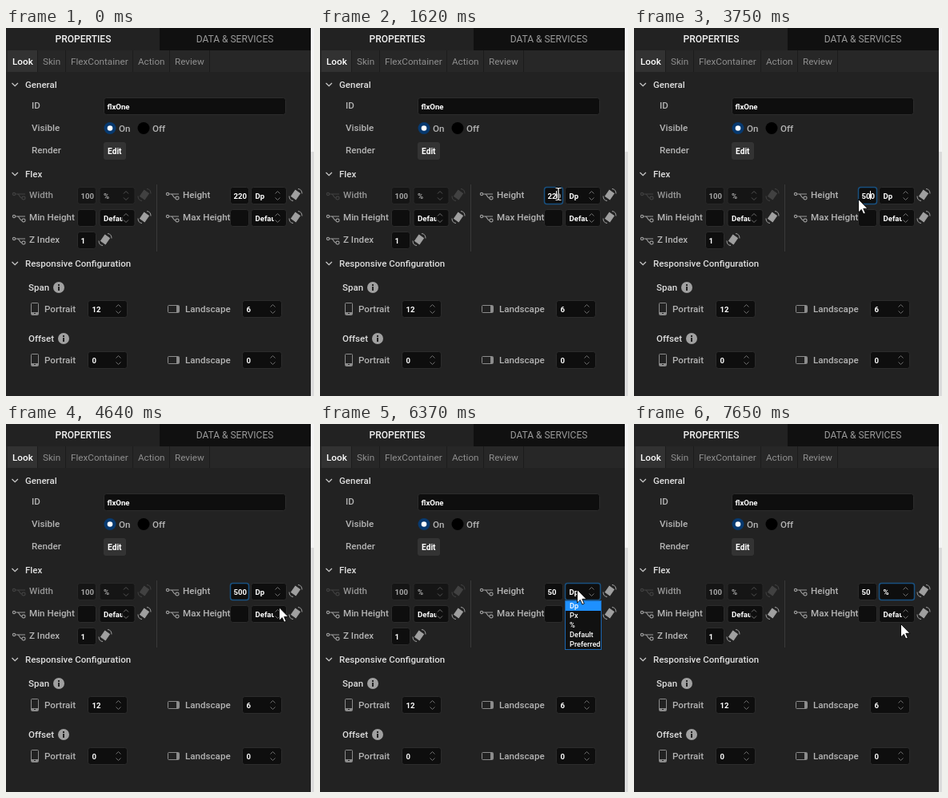
Animation, 385 px wide and 461 px high, one loop 8 s. Source, as an HTML page:

```html
<!DOCTYPE html>
<html lang="en">
<head>
<meta charset="utf-8">
<title>Properties panel</title>
<style>
  html, body { margin: 0; width: 100%; height: 100%; overflow: hidden; background: #222; }
  svg { display: block; font-family: Roboto, sans-serif; }
</style>
</head>
<body>
<svg id="stage" width="385" height="461" viewBox="0 0 385 461">
  <g id="panel"></g>
  <g id="live"></g>
</svg>
<script>
const LOOP = 8000;
const $ = id => document.getElementById(id);

const rect = (x, y, w, h, fill, extra = '') =>
  `<rect x="${x}" y="${y}" width="${w}" height="${h}" fill="${fill}" ${extra}/>`;
const text = (x, y, str, fill = '#b4b4b4', size = 11.6, weight = 500, extra = '') =>
  `<text x="${x}" y="${y}" fill="${fill}" font-size="${size}" font-weight="${weight}" ${extra}>${str}</text>`;
const line = (d, stroke, width = 1) =>
  `<path d="${d}" fill="none" stroke="${stroke}" stroke-width="${width}"/>`;
const fade = (alpha, markup) => `<g opacity="${alpha}">${markup}</g>`;

const box = (x, cy, w, focus) => rect(x + .5, cy - 10.5, w - 1, 21, '#0e0e0e',
  `rx="3" stroke="${focus ? '#185080' : '#2c2c2c'}" stroke-width="${focus ? 1.5 : 1}"`);
const value = (x, cy, str) => text(x, cy + 3.7, str, '#fff', 9.6, 700);
const field = (x, cy, w, str, focus) => box(x, cy, w, focus) + value(x + 4.5, cy, str);

function select(x, cy, w, str, focus) {
  const ax = x + w - 11.5;
  return box(x, cy, w, focus) +
    `<svg x="${x}" y="${cy - 10}" width="${w - 16}" height="20">${value(5.5, 10, str)}</svg>` +
    line(`M${ax - 3},${cy - 2.5}l3,-3l3,3M${ax - 3},${cy + 2.5}l3,3l3,-3`, '#707070');
}

const branch = (x, cy) => `<g transform="translate(${x} ${cy})" fill="none" stroke="#9a9a9a" stroke-width="1.2">
  <circle cx="2" cy="-2" r="1.6"/><path d="M4,-2H16M6,-2C9.5,-2 8.5,3 12,3"/>
  <rect x="12" y="1.2" width="4" height="3.6" rx="1.5"/></g>`;
const turn = (x, cy) => `<g transform="translate(${x} ${cy - 1})" stroke="#a0a0a0" fill="none">
  <rect x="-3.5" y="-4.5" width="7" height="9" fill="#a0a0a0" transform="rotate(35)"/>
  <path d="M3,-7.5Q8,-7 8,-1.5M-3,7.5Q-8,7 -8,1.5"/></g>`;
const info = (x, cy) => `<circle cx="${x}" cy="${cy}" r="7" fill="#a0a0a0"/>` +
  rect(x - 1, cy - 4, 2, 2, '#222') + rect(x - 1, cy - 1, 2, 5, '#222');
const heading = (x, y, str) => text(x, y, str, '#dedede', 11.5);
const section = (cy, name) =>
  line(`M7.5,${cy - 2}l3.7,3.7l3.7,-3.7`, '#c8c8c8', 1.3) + heading(24, cy + 4, name);

function flexRow(x, cy, name, num, unit, off) {
  const icons = branch(x, cy) + turn(x + (unit ? 165 : 116), cy);
  const inputs = field(x + 81, cy, 24, num) + (unit ? select(x + 108.5, cy, 45, unit) : '');
  return (off ? fade(.25, icons) + fade(.6, inputs) : icons + inputs) +
    text(x + 21, cy + 3, name, off ? '#959595' : undefined);
}

function deviceRow(cy, name, a, b) {
  return heading(28, cy - 23, name) + info(name === 'Span' ? 66 : 72, cy - 27) +
    rect(31.5, cy - 7.5, 9, 15, 'none', 'rx="1" stroke="#8c8c8c"') +
    rect(32, cy + 4, 8, 3, '#8c8c8c') + rect(35, cy + 5, 2, 1, '#222') +
    rect(202.5, cy - 4.5, 14, 9, 'none', 'rx="1" stroke="#8c8c8c"') + rect(213, cy - 4, 3, 8, '#8c8c8c') +
    text(48, cy + 4, 'Portrait') + text(224, cy + 4, 'Landscape') +
    select(102, cy, 50, a) + select(295, cy, 50, b);
}

function panel() {
  let s = rect(0, 0, 385, 461, '#222') + rect(192, 0, 193, 28, '#101010') +
    rect(0, 28, 385, 27, '#272727') + rect(2, 28, 37, 27, '#323232') +
    text(96.5, 18, 'PROPERTIES', '#f2f2f2', 12, 500, 'text-anchor="middle"') +
    text(286, 18, 'DATA &amp; SERVICES', '#9a9a9a', 12, 400, 'text-anchor="middle"') +
    line('M39.5,28V55M74.5,28V55M158.5,28V55M204.5,28V55M254.5,28V55', '#1c1c1c');
  const tabs = [[8, 'Look'], [46, 'Skin'], [81, 'FlexContainer'], [165, 'Action'], [211, 'Review']];
  tabs.forEach(([x, name], i) => s += text(x, 46, name, i ? '#8f8f8f' : '#fff', 11.7, i ? 400 : 500));
  s += section(71, 'General') + text(32, 101, 'ID') + text(32, 129, 'Visible') + text(32, 157, 'Render') +
    field(122, 98, 228, 'flxOne') +
    '<circle cx="130" cy="125.5" r="7.5" fill="#07396f"/><circle cx="130" cy="125.5" r="3.3" fill="#fff"/>' +
    '<circle cx="172" cy="125.5" r="7.5" fill="#000"/>' +
    text(141, 130, 'On') + text(183, 130, 'Off') +
    rect(122, 143, 28, 22, '#333', 'rx="3"') + text(127, 157.5, 'Edit', '#fff', 10.2, 700) +
    section(183, 'Flex') + line('M188.5,196V280', '#3a3a3a') +
    flexRow(8, 210, 'Width', '100', '%', true) + flexRow(8, 238, 'Min Height', '', 'Default') +
    flexRow(8, 266, 'Z Index', '1') +
    branch(200, 210) + text(221, 213, 'Height') + turn(362, 210) +
    branch(200, 238) + text(221, 241, 'Max Height') + field(280, 238, 24, '') +
    select(306, 238, 45, 'Default') + turn(362, 238) +
    section(295, 'Responsive Configuration') +
    deviceRow(352, 'Span', '12', '6') + deviceRow(416, 'Offset', '0', '0') +
    rect(381, 0, 4, 155, '#f4f4f4') + rect(381, 155, 4, 306, '#dcdcdc');
  return s;
}

// Pointer legs: start, end, steps, target
const legs = [
  [500, 1100, 11, 298, 214], [1360, 1420, 2, 298, 208], [1690, 1990, 5, 255, 207],
  [2190, 2370, 4, 280, 214], [4150, 4760, 10, 348, 231], [5490, 5610, 3, 337, 217],
  [5670, 6050, 7, 321, 207], [6630, 6930, 6, 327, 238], [7130, 7190, 2, 333, 250]
];
const ease = p => p * p * (3 - 2 * p);

function pointerAt(t) {
  let x = 258, y = 470;
  for (const [a, b, n, tx, ty] of legs) {
    if (t < a) break;
    const p = Math.min(1, (Math.floor((t - a) / (b - a) * (n - 1) + 1e-6) + 1) / n);
    x += (tx - x) * ease(p);
    y += (ty - y) * ease(p);
  }
  return [x, y];
}

function pointer(t, x, y) {
  const beam = t < 1990 && x > 280 && y < 222;
  const d = beam ? 'M-3.5,-7.5H-1L0,-6.5L1,-7.5H3.5M0,-6.5V6.5M-3.5,7.5H-1L0,6.5L1,7.5H3.5'
    : 'M.5,.5V17L4.3,13.4L6.8,19L9.3,18L6.8,12.3H12Z';
  return `<g transform="translate(${x} ${y})">` + (beam ? line(d, '#000', 3) + line(d, '#fff', 1.2)
    : `<path d="${d}" fill="#fff" stroke="#000" stroke-width=".9"/>`) + '</g>';
}

function heightField(t, x) {
  const focus = t >= 1620 && t < 6310;
  const selected = t >= 1690 && t < 3290;
  const str = t < 3290 ? '220' : t < 3750 ? '50' : t < 4760 ? '500' : '50';
  let s = box(280, 210, 24, focus);
  if (selected) {
    const left = Math.max(284, Math.min(295, x));
    s += rect(left, 204, 295.5 - left, 12, '#14247c');
  }
  s += value(284.5, 210, str);
  const typed = [1620, 3290, 3750, 4760].filter(k => k <= t).pop();
  const lit = t < 3750 || (t - typed) % 1060 < 530;
  if (focus && !selected && lit) s += rect(t >= 3290 && t < 3750 ? 289 : 295, 204, 1, 11, '#fff');
  return s;
}

function list(y) {
  const active = Math.max(0, Math.floor((y - 222) / 12));
  return rect(306.5, 221.5, 45, 61, '#111', 'stroke="#1b66b0"') + rect(307, 222 + active * 12, 44, 12, '#1e90ff') +
    ['Dp', 'Px', '%', 'Default', 'Preferred']
      .map((name, i) => text(312, 231.3 + i * 12, name, '#fff', 9.2, 500)).join('');
}

const tooltip = () => rect(289.5, 229.5, 91, 24, '#fff', 'stroke="#767676"') +
  text(297, 246, 'Widget height', '#575757', 11.7, 400, 'font-family="Open Sans, sans-serif"');

function live(t) {
  const [x, y] = pointerAt(t);
  let s = heightField(t, x) + select(306, 210, 45, t < 7650 ? 'Dp' : '%', t >= 6310);
  if (t >= 6370 && t < 7650) s += list(y);
  if (t >= 2630 && t < 3350) s += fade(t < 3290 ? 1 : .5, tooltip());
  return s + pointer(t, x, y);
}

$('panel').innerHTML = panel();
let shown = '';
function frame(now) {
  const s = live(now % LOOP);
  if (s !== shown) $('live').innerHTML = shown = s;
  requestAnimationFrame(frame);
}
frame(performance.now());
</script>
</body>
</html>
```
